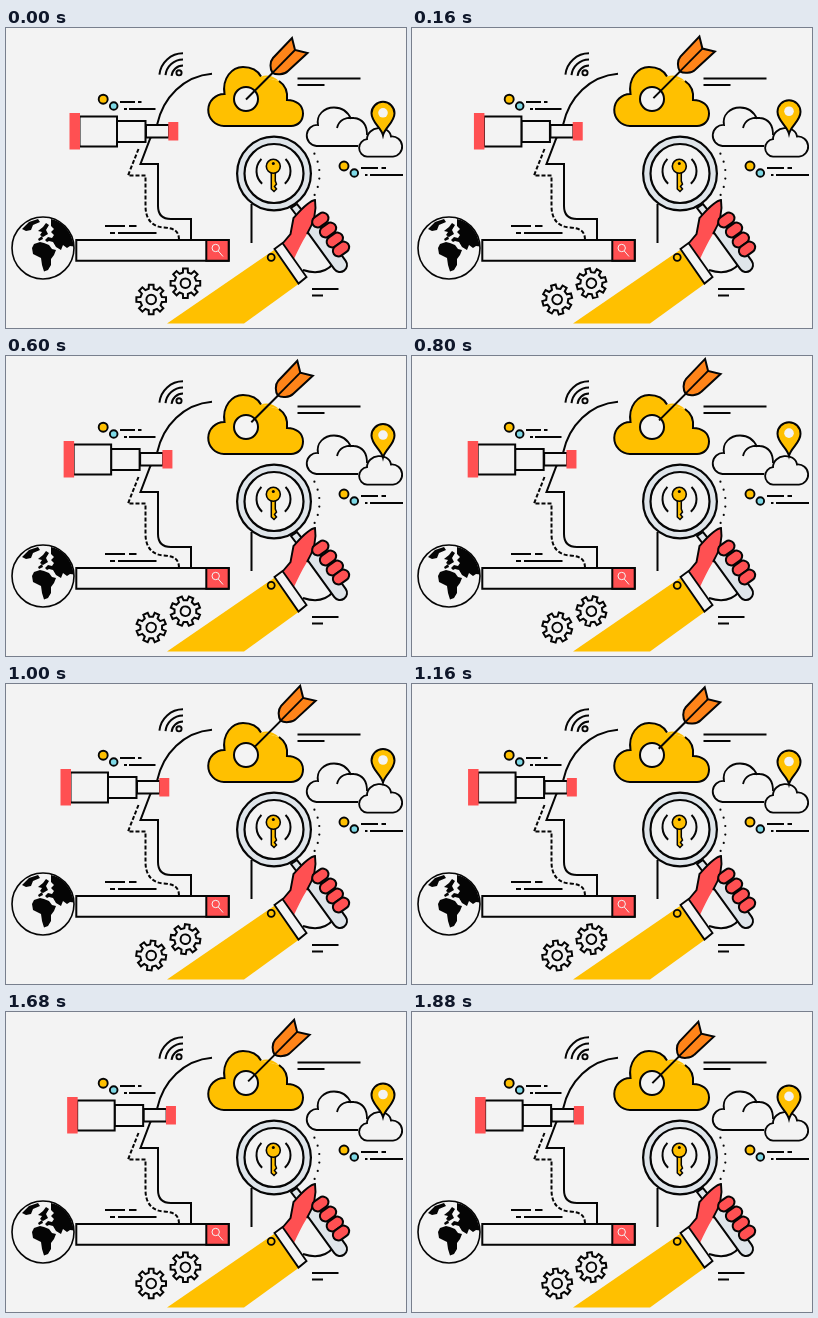
An HTML page with a canvas that plays this animation: 400x300 px, repeating every 1.92 s.

```html
<!DOCTYPE html>
<html lang="en">
<head>
<meta charset="utf-8">
<title>Search and discovery</title>
<style>
html, body { margin: 0; width: 100%; height: 100%; overflow: hidden; background: #f3f3f3; }
canvas { display: block; width: 400px; height: 300px; }
</style>
</head>
<body>
<canvas id="stage" width="400" height="300"></canvas>
<script>
const ctx = document.getElementById('stage').getContext('2d');
const LOOP = 1920, STEP = 40;
const INK = '#050505', RED = '#ff5052', YELLOW = '#ffc000', ORANGE = '#ff8419',
      BLUE = '#7fd9e6', STEEL = '#dfe5ea', BACK = '#f3f3f3';

function paint(path, fill, width = 2, color = INK) {
  if (fill) { ctx.fillStyle = fill; ctx.fill(path); }
  if (width) { ctx.lineWidth = width; ctx.strokeStyle = color; ctx.stroke(path); }
}
const shape = (d, fill, width, color) => paint(new Path2D(d), fill, width, color);

function circle(x, y, r, fill, width, color) {
  const p = new Path2D();
  p.arc(x, y, r, 0, Math.PI * 2);
  paint(p, fill, width, color);
}
function arc(x, y, r, from, to, width) {
  const p = new Path2D(), rad = Math.PI / 180;
  p.arc(x, y, r, from * rad, to * rad);
  paint(p, null, width);
}
function box(x, y, w, h, fill, width) {
  const p = new Path2D();
  p.rect(x, y, w, h);
  paint(p, fill, width);
}
function moved(x, y, angle, draw) {
  ctx.save();
  ctx.translate(x, y);
  ctx.rotate(angle);
  draw();
  ctx.restore();
}
function pill(x, y, w, h, angle, fill) {
  moved(x, y, angle, () => {
    const p = new Path2D();
    p.roundRect(-w / 2, -h / 2, w, h, h / 2);
    paint(p, fill);
  });
}

function head() {
  shape('M206 45.700C178 48 157 69 151 97L144 111L134.500 136H152V178C152 187 157 191 165 191H185V212M245.500 176V215');
  ctx.setLineDash([4, 2]);
  shape('M132.500 121L122 147.500H139.500V178C139.500 191 146 199 158 199.500C168 200 173 203 173 212');
  ctx.setLineDash([]);
}

function accents() {
  circle(97.2, 71.2, 4.5, YELLOW, 1.9);
  circle(107.7, 78, 3.8, BLUE, 1.9);
  circle(338, 138, 4.5, YELLOW, 1.9);
  circle(348.3, 145, 3.8, BLUE, 1.9);
  shape('M114 74H129M132 74H135.500M118 81H121M123 81H149.500' +
        'M355 140H372M375.500 140H380M359 147H361.500M364 147H397' +
        'M99 198H119M123 198H130.500M104 205H109M112 205H150.500' +
        'M306 261H332.500M306 267.500H317M291.500 50.500H354.500M291.500 57H318.500');
  for (const r of [11.5, 17.6, 23.7]) arc(177, 49, r, 186, 270);
  circle(173, 44.8, 2.6, null, 1.9);
}

function globe() {
  circle(37, 220, 31, BACK, 1.6);
  ctx.save();
  ctx.beginPath();
  ctx.arc(37, 220, 30.5, 0, Math.PI * 2);
  ctx.clip();
  shape('M26 220L28 216L34 214L38 215L43 217L46 221L50 222L48 227L45 231L45 237L42 242L38 243.500L36 237L35 230L31 228L27 226Z', INK, 0);
  shape('M45 191L52 193L72 202V219L64 218L61 220L57 217L55 222L50 219L47 214L43 213L41 214L39 212L42 209L46 210L48 207L45 204L48 201L45 198Z', INK, 0);
  shape('M16 201L23 194L32 191L34 194L27 197L25 202L20 203ZM32 203L37 199L40 195L43 197L40 202L42 206L37 209L34 207L36 204ZM32 211L36 208L37 211L33 213Z', INK, 0);
  ctx.restore();
}

function searchBar() {
  box(70.3, 212, 152.4, 20.7, BACK);
  box(200.3, 212, 22.4, 20.7, RED);
  circle(209.7, 220, 3.7, null, 1, BACK);
  shape('M212.300 223L217 228.500', null, 1, BACK);
}

function clouds() {
  // the outline stays open where the shaft crosses the top
  shape('M273 53C279 57 282 63 281 72C290 72 297 77 297 85.500C297 93 292 98 285 98H218A16 16 0 0 1 218.500 66C216 50 226 39 237 39C246 39 252 43 255 48.500', YELLOW, 0);
  shape('M255 48.500C261 46 268 48 273 53Z', YELLOW, 0);
  shape('M273 53C279 57 282 63 281 72C290 72 297 77 297 85.500C297 93 292 98 285 98H218A16 16 0 0 1 218.500 66C216 50 226 39 237 39C246 39 252 43 255 48.500');
  circle(240, 71, 12, BACK);
  shape('M352 118H310.500A10.500 10.500 0 0 1 312 97C310 87 318 79.500 328 79.500C337 79.500 342 84 345 91M331 100C333 91 341 89 348 90C357 91 361 97 361 107', null, 1.8);
  shape('M361 128.700A8.800 8.800 0 0 1 361 111.200C361 98 383 96 385 108.500A10 10 0 0 1 387 128.700Z', BACK, 1.8);
}

function arrow(shift) {
  moved(shift, -shift, 0, () => {
    shape('M240 71.500L267 44.500');
    shape('M266.500 44.800C264 41 263.500 34 267 30L286 10L289 22L301.500 25L282 43C278 47 270 47 266.500 44.800Z', ORANGE);
    shape('M266.500 44.800L289 22', null, 1.8);
  });
}

function pin(shift) {
  moved(377, 85.3 - shift, 0, () => {
    shape('M0 22C-2 14 -11.500 9 -11.500 0A11.500 11.500 0 1 1 11.500 0C11.500 9 2 14 0 22Z', YELLOW);
    circle(0, -0.5, 4.8, BACK, 0);
  });
}

function telescope(shift) {
  moved(-shift, 0, 0, () => {
    box(140, 97, 23, 12.5, BACK);
    box(111, 93, 28.5, 21, BACK);
    box(73.5, 88.5, 37.5, 30, BACK);
    box(63.5, 85, 10.5, 36.5, RED, 0);
    box(162.3, 94, 10, 18.5, RED, 0);
  });
}

function lens() {
  circle(268, 145.5, 36.9, STEEL, 2.2);
  circle(268, 145.5, 29.5, BACK, 2.2);
  arc(267.5, 143, 17, 132, 225);
  arc(267.5, 143, 17, -45, 48);
  shape('M265.300 144V161L268 163.500L270.500 161L268.500 158.500L270.500 156L269.300 153V144Z', YELLOW, 1.5);
  circle(267.3, 138.3, 7, YELLOW, 1.6);
  circle(267.3, 135.5, 1.5, INK, 0);
  for (let i = 0; i < 6; i++) {
    const a = -0.48 + i * 0.19;
    circle(268.5 + 45 * Math.cos(a), 146.5 + 45 * Math.sin(a), 1.1, INK, 0);
  }
}

function hand() {
  shape('M161 295.500L268 222L292.500 256L238 295.500Z', YELLOW, 0);
  shape('M327 236C320 244 309 246 297 242', null, 1.9);
  // neck and grip
  shape('M285 180L291 176L304 192L298 197Z', STEEL);
  pill(317, 213.5, 72, 14, 0.944, STEEL);
  shape('M309 172C302 173 293 184 287.500 190L284.500 206L277 215L288 231C292 222 296 214 301 206C307 196 311 184 309 172Z', RED, 0);
  shape('M277 215L284.500 206L287.500 190C293 184 302 173 309 172C311 184 307 196 301 206', null, 1.9);
  const fingers = [[314.3, 192], [322, 202], [328.8, 212], [335, 221]];
  for (const [x, y] of fingers) pill(x, y, 17.5, 11, -0.62, RED);
  shape('M268.500 221L276.500 215L300.500 249L292.500 255.500Z', BACK, 1.9);
  circle(265.2, 229.3, 3.5, YELLOW, 1.8);
}

function gear(x, y, angle) {
  const p = new Path2D(), teeth = 8, unit = Math.PI * 2 / teeth;
  const rim = [[-0.29, 11], [-0.2, 15], [0.2, 15], [0.29, 11]];
  for (let i = 0; i < teeth; i++) {
    for (const [a, r] of rim) {
      const t = (i + a) * unit;
      p.lineTo(r * Math.sin(t), -r * Math.cos(t));
    }
  }
  p.closePath();
  moved(x, y, angle, () => {
    paint(p, BACK);
    circle(0, 0, 4.8, null);
  });
}

function draw(time) {
  const phase = (Math.floor(time / STEP) * STEP % LOOP) / LOOP;
  const swing = 1 - Math.abs(1 - 2 * phase);
  ctx.fillStyle = BACK;
  ctx.fillRect(0, 0, 400, 300);
  ctx.lineJoin = 'miter';
  head();
  accents();
  globe();
  searchBar();
  clouds();
  arrow(8.5 * swing);
  pin(9.2 * swing);
  telescope(9.4 * swing);
  lens();
  hand();
  const turn = phase * Math.PI * 2;
  gear(145.2, 271.5, turn);
  gear(179.4, 255.2, turn);
}

let start = null;
function tick(now) {
  if (start === null) start = now;
  draw(now - start);
  requestAnimationFrame(tick);
}
draw(0);
requestAnimationFrame(tick);
</script>
</body>
</html>
```
